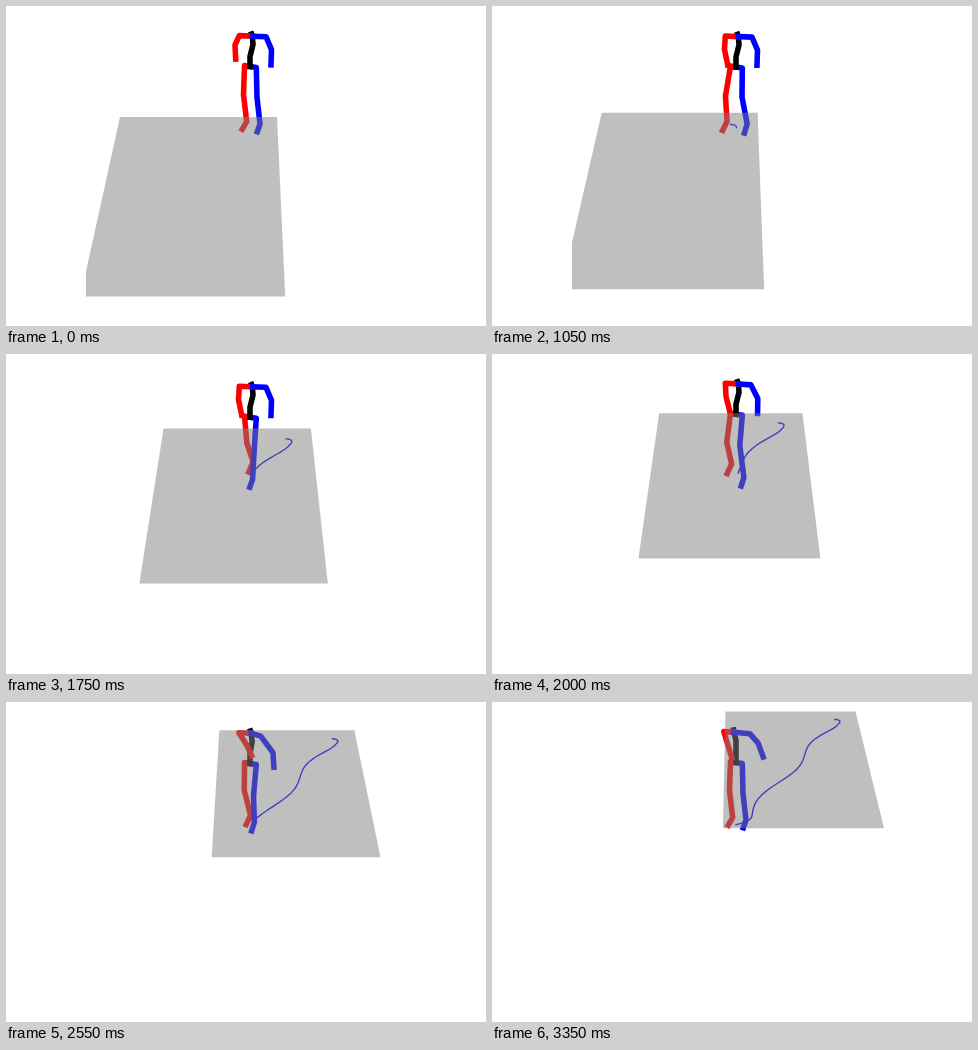
These frames come from a looping animation (480x320 px, 3.4 s). An HTML page with a canvas:

```html
<!DOCTYPE html>
<html lang="en">
<head>
<meta charset="utf-8">
<title>Walking skeleton</title>
<style>
html, body { margin: 0; width: 100%; height: 100%; overflow: hidden; background: #fff; }
canvas { display: block; }
</style>
</head>
<body>
<canvas id="stage" width="480" height="320"></canvas>
<script>
const ctx = document.getElementById('stage').getContext('2d');
const { cos, sin, PI, min, max } = Math;
const STEP = .05, LOOP = 3.4, CYCLE = .88;   // seconds
const CX = 244, HORIZON = -480, SPEED = .206;
const RED = '#f00', BLUE = '#00f';

// Resting legs; swing is how far the ankle moves sideways
const redLeg = { color: RED, phase: 0, hip: [-5.5, -1], knee: [237.5, 88.8], ankle: [240.7, 115.5], toe: -4.4, swing: 8.5 };
const blueLeg = { color: BLUE, phase: PI, hip: [6.3, 1], knee: [251, 91.5], ankle: [254, 118], toe: -2.7, swing: 6 };

const part = (t, a, b) => min(1, max(0, (t - a) / (b - a)));

function smooth(t, a, b) {
  const u = part(t, a, b);
  return u * u * (3 - 2 * u);
}

// Time integral of smooth()
function travel(t, a, b) {
  const u = part(t, a, b);
  return (b - a) * (u ** 3 - u ** 4 / 2) + max(0, t - b);
}

// The stride starts frozen and fades in, then fades out to a stand
const stride = t => smooth(t, .55, 1.1) - smooth(t, 2.85, 3.35);
const gait = t => 2 * PI * (max(t, 1.2) - 1.35) / CYCLE;

// Distance walked: a straight diagonal with a sway at each step
function ground(t) {
  const z = SPEED * (travel(t, .55, 1.87) - travel(t, 2.48, 3.35));
  return [.565 * z - stride(t) * (.006 + .01 * cos(gait(t) + 1.07)), z];
}

// Ground point to stage point
function project(x, depth) {
  const s = 1000 / depth;
  return [CX + x * s, HORIZON + s];
}

function trace(points) {
  ctx.beginPath();
  points.forEach(p => ctx.lineTo(...p));
}

function line(points, color, width = 5.56) {
  trace(points);
  ctx.strokeStyle = color;
  ctx.lineWidth = width;
  ctx.stroke();
}

function drawTrail(n, gx, gz) {
  const points = Array.from({ length: n }, (_, i) => {
    const [x, z] = ground(i * STEP);
    return project(gx - x, 1.659 + gz - z);
  });
  line(points, BLUE, 1.39);
}

function drawBody(t) {
  const w = stride(t), p = gait(t);
  const bob = w * (1.3 + 1.6 * cos(2 * p)), hips = 60.5 + bob;
  const at = (x, y) => [CX + x, hips + y];

  for (const { color, phase, hip, knee, ankle, toe, swing } of [redLeg, blueLeg]) {
    const c = cos(p + phase), s = sin(p + phase);
    const kneeX = knee[0] - w * (.45 * swing * c + 3 * s * s);
    const kneeY = knee[1] + bob + w * 2.2 * c;
    const x = ankle[0] - w * (1.7 + swing * c);
    const y = ankle[1] + w * (9.2 * c + 5 * s);
    const toeY = y + 7.8 + w * (1.2 - 1.3 * c - .6 * s);
    line([at(0, 0), at(...hip), [kneeX, kneeY], [x, y], [x + toe, toeY]], color);
  }

  const raise = 1 - smooth(t, 0, .6);          // red hand held up at first
  const turn = smooth(t, 2.2, 3.2);            // torso leans left
  const halt = smooth(t, 2.9, 3.35);
  const cross = smooth(t, 1.75, 2.65) - .6 * halt;   // arms swing across
  const neck = at(2.4 - 4.4 * turn, -30.3);

  line([at(0, 0), at(0, -10), at(3 - 3 * turn, -22), neck, at(1.6 - 4 * turn, -32.5)], '#000');
  line([neck, at(-10.7 - 1.5 * turn, -30.9),
    at(-11.5 - 3.5 * raise + 8 * cross, -17.5 - 4 * raise - 2 * cross),
    at(-8.3 - 6 * raise + 10.3 * cross, -2 - 5.5 * raise - 6.2 * cross)], RED);
  line([neck, at(16 - 5.5 * cross, -29.8 + 2.5 * cross),
    at(21.5 + 1.5 * cross, -16.8 + 6 * cross - 5 * halt),
    at(21 + 3 * cross, -1.7 + 5.5 * cross - 6 * halt).map((v, i) => i ? v : v + 5 * halt)], BLUE);
}

function drawFloor(gx, gz) {
  const left = gx - .22, right = gx + .0457, far = gz + 1.692, near = gz + 1.298;
  trace([project(left, far), project(right, far), project(right, near), project(left, near)]);
  ctx.fillStyle = 'rgba(128, 128, 128, .5)';
  ctx.fill();
}

function draw(n) {
  const t = n * STEP, shift = ground(t);
  ctx.clearRect(0, 0, 480, 320);
  ctx.save();
  ctx.beginPath();
  ctx.rect(80, 0, 320, 320);
  ctx.clip();
  ctx.lineCap = 'square';
  ctx.lineJoin = 'round';
  if (n > 1) drawTrail(n, ...shift);
  drawBody(t);
  drawFloor(...shift);
  ctx.restore();
}

function tick() {
  draw(Math.floor(performance.now() / 1000 % LOOP / STEP));
  requestAnimationFrame(tick);
}
tick();
</script>
</body>
</html>
```
